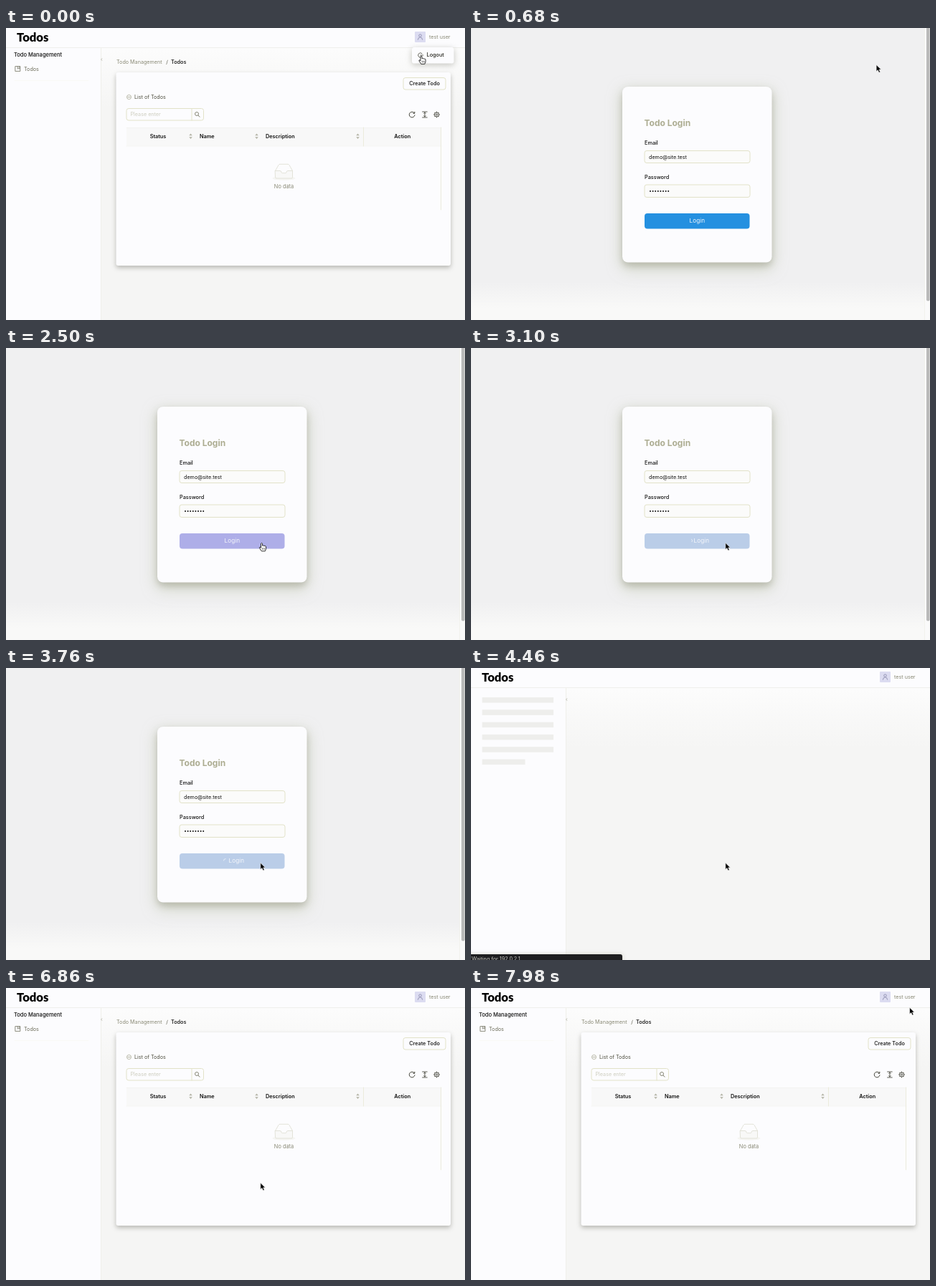
Animation of 640 by 408 pixels, one loop 8 s. Source, as an HTML page:

```html
<!DOCTYPE html>
<html lang="en">
<head>
<meta charset="utf-8">
<title>Todos</title>
<style>
html, body { margin: 0; width: 100%; height: 100%; overflow: hidden; background: #fcfcfe; }
svg { display: block; width: 100vw; height: 100vh; font-family: Inter, sans-serif; font-size: 7.2px; }
.logo { font: 900 16.6px Lato, sans-serif; }
.title { font-size: 7.5px; font-weight: 500; }
.head { font-size: 7.3px; font-weight: 600; }
.h1 { font-size: 12px; font-weight: 700; }
.label { font-size: 7.3px; font-weight: 500; }
.mid { text-anchor: middle; }
.card { filter: drop-shadow(0 3px 3px rgba(100, 100, 90, .42)); }
.menu { filter: drop-shadow(0 2px 4px rgba(120, 120, 105, .42)); }
.login { filter: drop-shadow(0 5px 5px rgba(110, 106, 92, .28)) drop-shadow(0 6px 10px rgba(165, 175, 140, .5)); }
</style>
</head>
<body>
<svg id="stage" viewBox="0 0 640 408" preserveAspectRatio="none"></svg>
<script>
const LOOP = 8000;
const T = { login: 420, press: 2440, loading: 2600, skeleton: 4220, list: 5060, settled: 5800 };
const INK = '#111110', SOFT = '#8a8a76', EDGE = '#e2e2c8', PAPER = '#fcfcfe';

const rect = (x, y, w, h, fill, r = 0, more = '') =>
  `<rect x="${x}" y="${y}" width="${w}" height="${h}" rx="${r}" fill="${fill}" ${more}/>`;
const text = (x, y, s, fill = INK, cls = '', more = '') =>
  `<text x="${x}" y="${y}" fill="${fill}" class="${cls}" ${more}>${s}</text>`;
const path = (d, stroke, w = 1, fill = 'none') =>
  `<path d="${d}" stroke="${stroke}" stroke-width="${w}" fill="${fill}" stroke-linecap="round" stroke-linejoin="round"/>`;
const group = (id, body) => `<g id="${id}">${body}</g>`;
const border = `stroke="${EDGE}"`;

const defs = `<defs>
  <linearGradient id="page" gradientUnits="userSpaceOnUse" x1="0" y1="28" x2="0" y2="112">
    <stop offset="0" stop-color="#fcfcfc"/><stop offset="1" stop-color="#f5f5f4"/>
  </linearGradient>
  <linearGradient id="grey" x1="0" y1="0" x2="0" y2="1">
    <stop offset=".87" stop-color="#f0f0f1"/><stop offset=".96" stop-color="#f9f9f8"/>
  </linearGradient>
</defs>`;

const shell =
  rect(0, 0, 640, 408, PAPER) +
  rect(132, 28, 508, 380, 'url(#page)') +
  path('M0 27.5H640', '#efefec') + path('M132.5 28V408', '#efefea') +
  text(15, 19, 'Todos', '#000', 'logo') +
  rect(570, 5, 15, 15, '#dcdcf1', 1) +
  `<circle cx="577.5" cy="10.6" r="1.8" fill="none" stroke="#8686a8" stroke-width=".8"/>` +
  path('M574.3 16.3q.4-3.4 3.2-3.4t3.2 3.4', '#8686a8', .8) +
  text(590, 15, 'test user', SOFT) +
  path('M133.8 42.6l-1.2 1.4 1.2 1.4', '#a5a594', .7);

const bars = [...Array(6).keys()]
  .map(i => rect(15.5, 41 + i * 17.3, i < 5 ? 99.5 : 60, 7.5, '#eeeeec')).join('');

const status =
  rect(-6, 400, 217, 14, '#1e1e20', 3, 'style="filter:drop-shadow(0 0 3px #d2d2c6)"') +
  text(1, 408.6, 'Waiting for 192.0.2.1...', '#c6c6c0');

const sorter = x =>
  `<path d="M${x - 2.3} 150.3h4.6l-2.3-2.8zM${x - 2.3} 152.3h4.6l-2.3 2.8z" fill="#b4b4a6"/>`;

const teeth = [...Array(8).keys()].map(i => {
  const a = i * Math.PI / 4, c = Math.cos(a), s = Math.sin(a);
  return `M${600.5 + 3.2 * c} ${121 + 3.2 * s}L${600.5 + 3.8 * c} ${121 + 3.8 * s}`;
}).join('');

const tools =
  path('M569.2 118.6A3.9 3.9 0 1 0 570 121.8M569.8 117.3v2h-2', '#333328', .9) +
  path('M580.6 117h6.6M580.6 125h6.6M583.9 118.2v5.6M582.6 119.2l1.3-1.2 1.3 1.2M582.6 122.8l1.3 1.2 1.3-1.2', '#333328', .8) +
  path(teeth, '#333328') +
  `<g fill="none" stroke="#333328" stroke-width=".8"><circle cx="600.5" cy="121" r="3.1"/><circle cx="600.5" cy="121" r="1.2"/></g>`;

const empty = group('empty',
  `<ellipse cx="387.5" cy="210" rx="16" ry="2.8" fill="#f5f5f2"/>` +
  path('M375.5 199.5l4.5-8q.8-1.2 2-1.2h11q1.2 0 2 1.2l4.5 8', '#dcdcd0', .8, PAPER) +
  path('M375.5 199.5h6.7q1.3 0 1.6 1.6t1.8 1.6h3.8q1.5 0 1.8-1.6t1.6-1.6h6.7v9q0 1.5-1.5 1.5h-21q-1.5 0-1.5-1.5z', '#dcdcd0', .8, '#f8f8f7') +
  text(387.5, 224.4, 'No data', SOFT, 'mid', 'font-size="7.4"'));

const list =
  text(11, 39.5, 'Todo Management', INK, 'title') +
  path('M13.2 53.6h6.6v6.8h-6.6zM16.2 53.8v3.4l1.3-1 1.3 1v-3.4', '#717160', .8) +
  text(25, 59.6, 'Todos', '#6d6d5a') +
  path('M12 73.5H115', '#f9f9f5') +
  text(154, 50.4, 'Todo Management', SOFT) + text(223.2, 50.4, '/', '#555544') +
  text(230, 50.4, 'Todos', INK, 'label') +
  rect(153.5, 62, 466.5, 270, PAPER, 3, 'class="card"') +
  rect(554, 69.5, 59, 16.5, PAPER, 3, border) +
  text(583.5, 80.2, 'Create Todo', INK, 'label mid') +
  `<circle cx="171.5" cy="96.5" r="3" fill="none" stroke="#a2a28c" stroke-width=".8"/>` +
  path('M170 96.5h3', '#a2a28c', .8) +
  text(179, 99, 'List of Todos', '#505040') +
  rect(168, 112.5, 107.5, 16.5, PAPER, 3, border) + path('M259 112.5V129', EDGE) +
  text(173.5, 123.3, 'Please enter', '#cdcdbe') +
  `<circle cx="266" cy="120" r="2.5" fill="none" stroke="#7c7c68" stroke-width=".9"/>` +
  path('M268 122l2 2.2', '#7c7c68') + tools +
  rect(168, 139, 439, 26, '#f8f8f8') +
  path('M168 139.5H607M168 165H607', '#f3f3f0', .8) +
  path('M498.5 139V165M606.5 139V254', '#ebebdc') +
  text(212, 153.7, 'Status', INK, 'head mid') + text(270, 153.7, 'Name', INK, 'head') +
  text(362, 153.7, 'Description', INK, 'head') + text(552.7, 153.7, 'Action', INK, 'head mid') +
  [257.5, 349.5, 490.5].map(sorter).join('') + empty +
  group('column', path('M562.5 166V254', '#f0f0e6'));

const menu =
  rect(566, 27, 58.5, 22.5, PAPER, 3, 'class="menu"') +
  path('M580 35.6a3.2 3.2 0 1 0 0 4.8M577.8 38h4', '#444438', .8) +
  text(586.5, 40.3, 'Logout', '#2a2a22', 'label');

const dots = [...Array(8).keys()]
  .map(i => `<circle cx="${250 + i * 3.6}" cy="228" r="1" fill="${INK}"/>`).join('');

const login =
  rect(0, 0, 640, 408, 'url(#grey)') +
  rect(632.5, 0, 7.5, 408, '#fafafa') + path('M632.5 0V408', '#f0f0ea', .8) +
  rect(635, -5, 4.6, 386.5, '#b9b9b9', 2.3) +
  rect(211, 82, 208.5, 245.5, PAPER, 8, 'class="login"') +
  text(241.5, 137.2, 'Todo Login', '#adad92', 'h1') +
  text(242, 163.2, 'Email', INK, 'label') + rect(242, 171.5, 147, 17, '#fbfbfa', 3, border) +
  text(248, 182.6, 'demo@site.test') +
  text(242, 210.6, 'Password', INK, 'label') + rect(242, 219, 147, 17.5, '#fbfbfa', 3, border) + dots +
  rect(242, 259, 146.5, 21.5, '#2490e0', 4, 'id="button"') +
  group('caption', text(315.3, 272.4, 'Login', '#f4f6fb', 'mid', 'font-size="8.2"')) +
  group('spinner', path('M306 266.6a2.6 2.6 0 0 1 2.6 2.6', '#eef3fa', .8));

const arrow = '<path d="M-.7 0v9.2l2.1-2 1.6 3.6 1.8-.8-1.6-3.4h2.8z" fill="#000" stroke="#fff" stroke-width=".6"/>';
const hand = '<g transform="translate(1 0)"><path d="M-1 .9Q0-.6 1 .9v3q1-.7 1.7.2 1-.6 1.7.3 1.3-.4 1.6.8v3.3L4.8 11.5H-.2L-3 7.2q-.5-1.3.7-1.3L-1 7z" fill="#fff" stroke="#000" stroke-width=".8" stroke-linejoin="round"/>' +
  '<path d="M1 7v2.5M2.6 7v2.5M4.2 7v2.5" stroke="#000" stroke-width=".5"/></g>';

document.getElementById('stage').innerHTML = defs +
  group('app', shell + group('bars', bars) + group('status', status) + group('list', list) + group('menu', menu)) +
  group('login', login) +
  group('cursor', group('arrow', arrow) + group('hand', hand));

const el = {};
document.querySelectorAll('#stage [id]').forEach(n => el[n.id] = n);

const show = (id, on) => el[id].setAttribute('display', on ? 'inline' : 'none');
const move = (id, x, y) => el[id].setAttribute('transform', `translate(${x} ${y})`);
const part = (t, a, b) => Math.min(1, Math.max(0, (t - a) / (b - a)));
const ease = p => p * p * (3 - 2 * p);
const mix = (a, b, p) => a.map((v, i) => v + (b[i] - v) * p);
const rgb = c => `rgb(${c.map(Math.round)})`;

// Each move: start, end, x, y
const home = [578, 38.8];
const moves = [
  [560, 1400, 361.8, 264.6],
  [1700, 2100, 355.5, 272.3],
  [6900, 7940, 612.3, 27.3]
];
const cursorAt = t => moves.reduce(
  (pos, [a, b, x, y]) => mix(pos, [x, y], ease(part(t, a, b))), home);

const blue = [36, 144, 224], lilac = [174, 174, 232], pale = [186, 205, 232];

function render(t) {
  const onLogin = t >= T.login && t < T.skeleton;
  const onList = t < T.login || t >= T.list;
  const settling = t >= T.list && t < T.settled;
  show('login', onLogin);
  show('app', !onLogin);
  show('list', onList);
  show('bars', !onList);
  show('status', !onList);
  show('menu', t < T.login);
  show('column', settling);
  move('empty', settling ? -21.7 : 0, 0);

  const busy = t >= T.loading;
  const fill = t < T.press ? blue : mix(lilac, pale, part(t, 2520, 2680));
  el.button.setAttribute('fill', rgb(fill));
  move('caption', 6 * ease(part(t, T.loading, T.loading + 200)), 0);
  show('spinner', busy);
  el.spinner.setAttribute('transform', `rotate(${t * .36} 306 269.2)`);

  const [x, y] = cursorAt(t);
  const overButton = onLogin && !busy && x > 242 && x < 388 && y > 259 && y < 280;
  const pointing = t < T.login || overButton;
  move('cursor', x, y);
  show('hand', pointing);
  show('arrow', !pointing);
}

function tick() {
  render(performance.now() % LOOP);
  requestAnimationFrame(tick);
}
tick();
</script>
</body>
</html>
```
